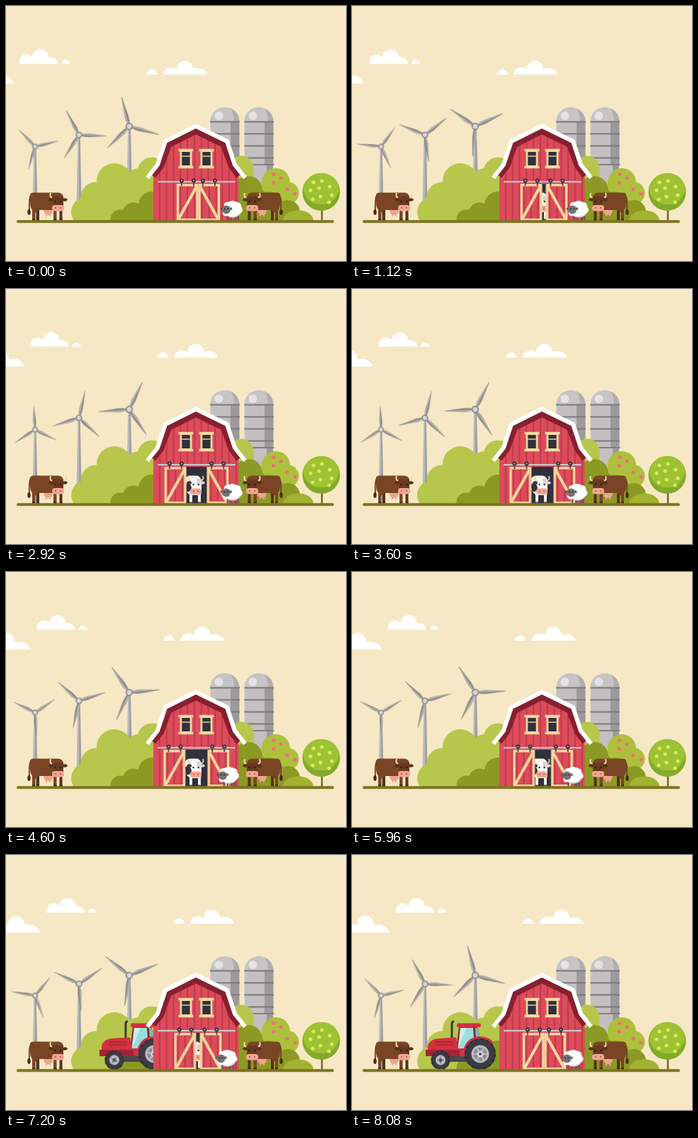
An HTML page that plays this animation: 480 px wide and 360 px high, repeating every 8120 ms.

```html
<!DOCTYPE html>
<html lang="en">
<head>
<meta charset="utf-8">
<title>Farm</title>
<style>
html, body { margin: 0; width: 100%; height: 100%; overflow: hidden; background: #f6e8c4; }
svg { display: block; width: 480px; height: 360px; }

.spin, .drift, .left, .right, .sheep, .drive, .roll, .roll-small {
  animation: 8120ms linear infinite;
}
.spin { animation-name: spin; }
.drift { animation-name: drift; }
.left { --open: -18.5px; animation-name: slide; }
.right { --open: 13.3px; animation-name: slide; }
.sheep { animation-name: walk; }
.drive { animation-name: drive; }
.roll { --turn: 393deg; animation-name: roll; }
.roll-small { --turn: 665deg; animation-name: roll; }
.left, .right, .sheep, .drive, .roll, .roll-small {
  animation-timing-function: cubic-bezier(.333, 0, .667, 1);
}

/* one turn takes 2020 ms */
@keyframes spin { to { transform: rotate(1447.13deg); } }
@keyframes drift { to { transform: translateX(43px); } }
@keyframes slide {
  0%, 3.1% { transform: none; }
  42.5%, 60.1% { transform: translateX(var(--open)); }
  99.5%, 100% { transform: none; }
}
@keyframes walk {
  0%, 32% { transform: none; }
  71.4%, 100% { transform: translateX(-7.5px); }
}
@keyframes drive {
  0%, 60.1% { transform: translateX(151px); }
  99.5%, 100% { transform: none; }
}
@keyframes roll {
  0%, 60.1% { transform: rotate(var(--turn)); }
  99.5%, 100% { transform: none; }
}
</style>
</head>
<body>
<svg viewBox="0 0 480 360">
<defs>
  <clipPath id="above"><rect width="480" height="303"/></clipPath>
  <pattern id="planks" width="9.8" height="10" x="208" patternUnits="userSpaceOnUse">
    <rect width="9.8" height="10" fill="#dc4b5a"/>
    <rect x="8.2" width="1.6" height="10" fill="#b93547"/>
  </pattern>
  <linearGradient id="steel">
    <stop offset=".5" stop-color="#bbb9ba"/>
    <stop offset=".5" stop-color="#a19fa1"/>
  </linearGradient>
  <linearGradient id="silo">
    <stop offset=".7" stop-color="#c2c0c1"/>
    <stop offset=".7" stop-color="#9c999b"/>
  </linearGradient>

  <path id="cloud" fill="#fff" d="M0 0C0-9 12-13 19-8A11.500 11.500 0 0 1 42-8.500C52-11 61-7 62 0Z"/>
  <path id="tall-cloud" fill="#fff" d="M0 0C-1-14 12-17 18-9A11.500 11.500 0 0 1 41-9C48-10 54-6 54 0Z"/>
  <path id="puff" fill="#fff" d="M0 0C2-10 13-10 16 0Z"/>

  <g id="blade">
    <path d="M3-1.300Q9-3.400 16-3L43-.4V.4L3 .2Z" fill="#b0adad"/>
    <path d="M3 0H43L43 .5 16 2.800Q9 3 3 1.300Z" fill="#8c8888"/>
  </g>
  <g id="rotor">
    <use href="#blade"/>
    <use href="#blade" transform="rotate(120)"/>
    <use href="#blade" transform="rotate(240)"/>
    <circle r="5.2" fill="#8c8888"/>
    <circle r="3.4" fill="#d6d4d4"/>
  </g>

  <g id="silo-top">
    <path d="M0 20A20.500 20 0 0 1 41 20V107H0Z" fill="url(#silo)"/>
    <path d="M0 20A20.500 20 0 0 1 41 20Z" fill="#c6c4c5"/>
    <path d="M29 2A20.500 20 0 0 1 41 20H33Q34 10 29 2Z" fill="#b1aeb0"/>
    <circle cx="12" cy="12" r="6" fill="#e4e3e3"/>
    <path d="M-.5 20.500h42M-.5 37.500h42M-.5 54.500h42M-.5 71.500h42" stroke="#7f7a7c" stroke-width="1.8"/>
  </g>

  <g id="window">
    <rect x="2" y="2" width="17" height="25" fill="#f5d99f"/>
    <rect x="4.8" y="5" width="11.4" height="19" fill="#30313d"/>
    <path d="M4.8 11h11.4" stroke="#f5d99f" stroke-width="1.4"/>
    <path d="M0 2.5h21M0 26.500h21" stroke="#f5d99f" stroke-width="3.4"/>
  </g>

  <g id="door">
    <rect x="241" y="251" width="30.5" height="52" fill="url(#planks)"/>
    <path d="M244 300L269 255" stroke="#f5d99f" stroke-width="4"/>
    <rect x="242.6" y="252.8" width="27.4" height="49" fill="none" stroke="#f5d99f" stroke-width="3.4"/>
    <path d="M248 245v9M265 245v9" stroke="#3a3640" stroke-width="1.6"/>
    <circle cx="248" cy="246.5" r="3" fill="#3a3640"/>
    <circle cx="265" cy="246.5" r="3" fill="#3a3640"/>
    <circle cx="248" cy="246.5" r="1" fill="#bbb9bb"/>
    <circle cx="265" cy="246.5" r="1" fill="#bbb9bb"/>
  </g>

  <g id="cow">
    <path d="M36 266Q32 268 33 289" fill="none" stroke="#6b3d22" stroke-width="1.8"/>
    <ellipse cx="32.5" cy="291" rx="2.2" ry="4" fill="#49291a"/>
    <path d="M43 284h4v19h-4zM75.500 284h4v19h-4z" fill="#57301c"/>
    <path d="M53 286H66Q66 294 63 294V297H61V295H58V297H56V294Q53 293 53 286Z" fill="#f0a28f"/>
    <path d="M34 267Q34 263.5 39 263.5H74Q81 264 81 271V282Q81 288 74 288H46L41 292V303H37V288Q34 284 34 278Z" fill="#7a4524"/>
    <path d="M67 286h4.500v17h-4.500z" fill="#7a4524"/>
    <path d="M37 300.500h4v2.500h-4zM43 300.500h4v2.500h-4zM67 300.500h4.500v2.500h-4.500zM75.500 300.500h4v2.500h-4z" fill="#3f2518"/>
    <path d="M65 271Q61 269 63 264M82 271Q86 269 84 264" fill="none" stroke="#f0dcae" stroke-width="2"/>
    <path d="M67 272Q61 270 60 274Q63 277 67 275ZM80 272Q86 270 87 274Q84 277 80 275Z" fill="#57301c"/>
    <path d="M66 269H81L80 286H67Z" fill="#683a20"/>
    <circle cx="69.5" cy="276" r="1.2" fill="#26170f"/>
    <circle cx="77.5" cy="276" r="1.2" fill="#26170f"/>
    <rect x="65" y="281" width="17" height="8.5" rx="4" fill="#f2a692"/>
    <circle cx="70" cy="285" r="1" fill="#9b5348"/>
    <circle cx="77" cy="285" r="1" fill="#9b5348"/>
  </g>
</defs>

<rect width="480" height="360" fill="#f6e8c4"/>

<g class="drift">
  <use href="#tall-cloud" x="19" y="81.500"/>
  <use href="#puff" transform="translate(78 81.5) scale(.78)"/>
  <use href="#puff" x="198" y="97"/>
  <use href="#cloud" x="222" y="97"/>
  <use href="#cloud" transform="translate(-56 109.5) scale(1.06 1.2)"/>
</g>

<g fill="url(#steel)">
  <path d="M39.5 198h3L45 303h-8z"/>
  <path d="M101.5 182h3.2L107 303h-8z"/>
  <path d="M172.3 170h3.6L178 260h-7.5z"/>
</g>
<g transform="translate(41 198.5) rotate(-134) scale(.78)"><use href="#rotor" class="spin"/></g>
<g transform="translate(103 182) rotate(-118) scale(.9)"><use href="#rotor" class="spin"/></g>
<g transform="translate(174 170) rotate(-105)"><use href="#rotor" class="spin"/></g>

<!-- silos -->
<use href="#silo-top" x="288.500" y="143"/>
<g>
  <svg x="336.500" y="143" width="42" height="81" viewBox="0 0 42 81"><use href="#silo-top"/></svg>
  <path d="M348.500 224h28.500v29h-28.500z" fill="url(#silo)"/>
  <path d="M347 224h31.500" stroke="#7f7a7c" stroke-width="1.8"/>
</g>

<!-- left bushes -->
<g clip-path="url(#above)">
  <g fill="#b6c74b">
    <circle cx="113" cy="291" r="21"/>
    <circle cx="127" cy="270" r="21.500"/>
    <circle cx="153" cy="247" r="25"/>
    <circle cx="188" cy="250" r="21"/>
    <circle cx="206" cy="234" r="20.500"/>
    <path d="M113 303V285L130 255H230V303Z"/>
  </g>
  <g fill="#8c9a24">
    <circle cx="161" cy="301" r="13.500"/>
    <circle cx="180" cy="293" r="15.500"/>
    <circle cx="206" cy="281" r="19"/>
    <path d="M165 303V295L195 285H225V303Z"/>
  </g>
</g>

<!-- tractor -->
<g class="drive">
  <path d="M141 258V238Q141 235 144 235" fill="none" stroke="#3b3a43" stroke-width="3"/>
  <path d="M151 242H177L184 274H147Z" fill="#8f2433"/>
  <path d="M153 244H171L173 274H149Z" fill="#9edddd"/>
  <path d="M153 244H162L151 270Z" fill="#c8efec"/>
  <path d="M174 244H177L182 262H175Z" fill="#75bfc4"/>
  <rect x="148" y="237.500" width="34" height="5.500" rx="2.500" fill="#d5303e"/>
  <path d="M107 277V270Q109 260 122 259L147 257.500L150 273H173V287H115Z" fill="#d5303e"/>
  <path d="M104 275H152V284H104Z" fill="#a62334"/>
  <path d="M117 264H143M117 268H143" stroke="#a62334" stroke-width="1.500"/>
  <path d="M136 284H166V292H136Z" fill="#4a4750"/>
  <path d="M156 280Q160 257 180 256Q195 256 200 266L196 270H165L160 284Z" fill="#d5303e"/>
  <g transform="translate(181 281)">
    <circle r="22" fill="#3c3b44"/>
    <g class="roll">
      <circle r="20.700" fill="none" stroke="#2d2c34" stroke-width="2.600" stroke-dasharray="4 4.130"/>
      <circle r="12.500" fill="#bebdc2"/>
      <circle r="9.500" fill="#8d8c94"/>
      <path d="M-10 0H10M-5-8.700L5 8.700M5-8.700L-5 8.700" stroke="#bebdc2" stroke-width="2.200"/>
      <circle r="4.500" fill="#d9d8dc"/>
      <circle r="2" fill="#55535c"/>
    </g>
  </g>
  <g transform="translate(125 289.500)">
    <circle r="13.500" fill="#3c3b44"/>
    <g class="roll-small">
      <circle r="12.400" fill="none" stroke="#2d2c34" stroke-width="2.200" stroke-dasharray="3 3.490"/>
      <circle r="7" fill="#bebdc2"/>
      <path d="M-5 0H5M0-5V5" stroke="#8d8c94" stroke-width="1.800"/>
      <circle r="2.500" fill="#55535c"/>
    </g>
  </g>
</g>

<!-- right bushes -->
<g clip-path="url(#above)">
  <g fill="#b6c74b">
    <circle cx="332" cy="229" r="17.500"/>
    <path d="M320 303V229H349.500V303Z"/>
  </g>
  <g fill="#adc03c">
    <circle cx="381" cy="249" r="20"/>
    <circle cx="397.500" cy="264" r="16"/>
    <path d="M361 250H400V303H361Z"/>
  </g>
  <g fill="#ef6d73">
    <circle cx="378" cy="237.500" r="2.600"/><circle cx="388" cy="243" r="2.600"/>
    <circle cx="377.500" cy="249.500" r="2.600"/><circle cx="397" cy="259" r="2.600"/>
    <circle cx="408" cy="265" r="2.600"/>
  </g>
  <g fill="#8c9a24">
    <circle cx="342" cy="260" r="20"/>
    <circle cx="371" cy="283" r="21"/>
    <circle cx="398" cy="291" r="17"/>
    <path d="M320 260H362L380 275V303H320Z"/>
  </g>
  <ellipse cx="412.500" cy="303" rx="21.500" ry="14.500" fill="#a3b22f"/>
</g>

<!-- tree -->
<path d="M446 285V303" stroke="#705f26" stroke-width="2.400"/>
<ellipse cx="445" cy="262.500" rx="26.500" ry="26.500" fill="#83aa2b"/>
<path d="M445 236C462 236 471 248 470 261C466 273 457 281 446 280C434 281 423 273 420 261C420 248 429 236 445 236Z" fill="#9dc234"/>
<g fill="#dcea58">
  <circle cx="434" cy="249" r="2.600"/><circle cx="446" cy="247" r="2.600"/>
  <circle cx="457" cy="255" r="2.600"/><circle cx="430" cy="260" r="2.600"/>
  <circle cx="442" cy="257" r="2.600"/><circle cx="460" cy="267" r="2.600"/>
  <circle cx="433" cy="273" r="2.600"/><circle cx="444" cy="269" r="2.600"/>
  <circle cx="456" cy="277" r="2.600"/>
</g>

<!-- barn -->
<path d="M208 303V235L217 224L227 193L268 172L310 193L319 224L328.500 235V303Z" fill="url(#planks)"/>
<path d="M208 240L219 226L230 196L268 177L307 196L318 226L328.500 240" fill="none" stroke="#86202f" stroke-width="8"/>
<path d="M199.500 242.500L214 224L225 191L268 169.500L312 191L323 224L337.500 242.500" fill="none" stroke="#fff" stroke-width="6"/>
<use href="#window" x="243.500" y="201"/>
<use href="#window" x="272.500" y="201"/>

<rect x="241" y="251" width="61" height="52" fill="#30313d"/>
<g>
  <path d="M253 268Q255 263 261 263.500H270Q276 265 276 273V286L275 291V303H271V291H263V303H259V290Q253 287 253 277Z" fill="#f4f2f0"/>
  <path d="M253 275Q261 273 262 281Q261 287 255 286Q252 281 253 275Z" fill="#34323a"/>
  <path d="M259 300.500h4v2.500h-4zM271 300.500h4v2.500h-4z" fill="#55515a"/>
  <path d="M261 270.500Q256 269 258 264M275 270.500Q280 269 278 264" fill="none" stroke="#e9cf9c" stroke-width="2"/>
  <path d="M262 272Q256 270 255 274Q258 277 262 275Z" fill="#34323a"/>
  <path d="M274 272Q280 270 281 274Q278 277 274 275Z" fill="#d9d5d5"/>
  <path d="M261.500 268H274.500L273.500 286H262.500Z" fill="#fff"/>
  <path d="M269 268H274.500L274 278Q269 278 269 268Z" fill="#d9d5d5"/>
  <circle cx="264.500" cy="276" r="1.200" fill="#26222a"/>
  <circle cx="271.500" cy="276" r="1.200" fill="#26222a"/>
  <rect x="260" y="281.500" width="16" height="8.500" rx="4" fill="#f2a692"/>
  <circle cx="265" cy="285.500" r="1" fill="#9b5348"/>
  <circle cx="271" cy="285.500" r="1" fill="#9b5348"/>
</g>
<rect x="214" y="247" width="110" height="2.200" rx="1" fill="#c9c6ca"/>
<g class="left"><use href="#door"/></g>
<g class="right"><use href="#door" transform="matrix(-1 0 0 1 543 0)"/></g>

<!-- animals -->
<use href="#cow"/>
<use href="#cow" transform="matrix(-1 0 0 1 421 0)"/>
<g class="sheep">
  <path d="M313 295v8M318 295v8M324 295v8M328 295v8" stroke="#5b5859" stroke-width="2.200"/>
  <ellipse cx="320" cy="287" rx="13" ry="11.500" fill="#e4e0de"/>
  <g fill="#fff">
    <ellipse cx="319.500" cy="286" rx="12.500" ry="10.500"/>
    <circle cx="312" cy="281" r="4"/><circle cx="320" cy="279" r="4"/>
    <circle cx="327.500" cy="281.500" r="4"/><circle cx="330" cy="288" r="4"/>
    <circle cx="310" cy="292" r="4.500"/>
  </g>
  <path d="M305 284Q302 285 303 288L307 287ZM317 284Q320 285 319 288L315 287Z" fill="#5b5859"/>
  <ellipse cx="311" cy="287.500" rx="6" ry="6" fill="#757172"/>
  <circle cx="308.800" cy="286.500" r="1" fill="#252325"/>
  <circle cx="313.200" cy="286.500" r="1" fill="#252325"/>
</g>

<rect x="15" y="302.300" width="448" height="4" rx="2" fill="#7b7523"/>
</svg>
</body>
</html>
```
